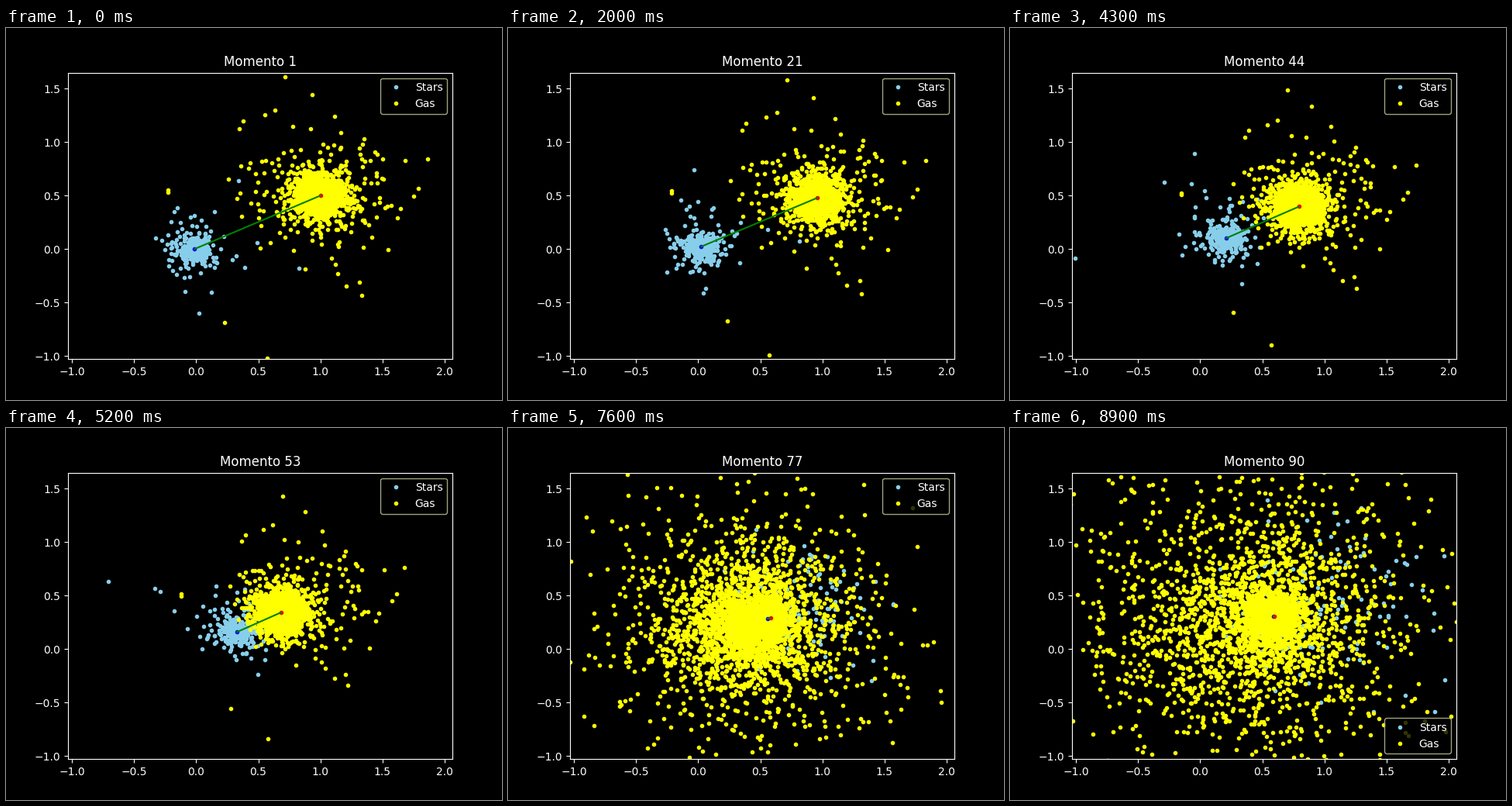
Recreate the animation shown at these times as a matplotlib script. Size 640x480 px, loop 9 s.

```python
import numpy as np
import matplotlib.pyplot as plt
from matplotlib.animation import FuncAnimation

plt.style.use("dark_background")
rng = np.random.default_rng(7)

FRAMES = 90
N_GAS, N_STARS = 3700, 390
MASS_CENTER = 0.62 + 0.30j
LEGEND_MOVE = 80

# Sparse outer particles as x + iy
GAS_HALO = np.array([
    .715+1.61j, .935+1.44j, .635+1.30j, .55+1.255j, 1.115+1.24j, .38+1.195j,
    .35+1.125j, .78+1.145j, .92+1.125j, 1.35+1.03j, 1.86+.84j, 1.68+.825j,
    1.50+.84j, 1.79+.565j, 1.75+.49j, 1.57+.405j, 1.45+.30j, 1.545-.01j,
    1.415+.11j, 1.315-.31j, 1.33-.435j, 1.21-.35j, 1.14-.23j, .88-.185j,
    .57-1.02j, .23-.69j, -.23+.55j, -.23+.53j, .26+.65j, .33+.47j,
    .365+.305j, .355+.52j, .515+.01j, .36+.775j, .42+.755j, .48+.54j])
STAR_HALO = np.array([
    -.325+.10j, -.275+.08j, -.15+.385j, -.175+.35j, .15+.35j, .34+.64j,
    .49+.06j, .83-.18j, .39-.17j, .32-.065j, .29-.10j, -.09-.40j,
    .12-.405j, .02-.60j, -.22-.16j, -.16-.24j, -.25-.01j])


def track(times, points):
    """Smooth path through the points, sampled once per frame."""
    k, p = np.array(times, float), np.array(points)
    m = np.gradient(p, k)
    n = np.arange(FRAMES)
    i = np.clip(np.searchsorted(k, n, "right") - 1, 0, len(k) - 2)
    h = k[i + 1] - k[i]
    s = (n - k[i]) / h
    return ((2*s**3 - 3*s**2 + 1) * p[i] + (s**3 - 2*s**2 + s) * h * m[i]
            + (3*s**2 - 2*s**3) * p[i + 1] + (s**3 - s**2) * h * m[i + 1])


def smooth(x):
    x = np.clip(x, 0, 1)
    return x * x * (3 - 2 * x)


def direction(n):
    return np.exp(2j * np.pi * rng.random(n))


def cluster(n, scale, cut):
    """Projected Plummer sphere, truncated at mass fraction cut."""
    u = rng.uniform(0, cut, n)
    return scale * np.sqrt(u / (1 - u)) * direction(n)


KEYS = [0, 20, 33, 52, 68, 76, 89]
APPROACH = [1.003+.50j, .96+.478j, .89+.443j, .685+.342j, .45+.232j]
cloud = track(KEYS, APPROACH + [.36+.20j, .38+.23j])
gas_mid = track(KEYS, APPROACH + [.583+.29j, .598+.305j])
star_mid = track(KEYS, [-.012+0j, .025+.022j, .104+.053j, .328+.158j,
                        .597+.298j, .56+.283j, .591+.305j])

# Gas: an orbiting core, part of it thrown out when the clusters meet
gas0 = np.r_[cluster(N_GAS, 0.068, 0.99), GAS_HALO - cloud[0]]
n_gas = len(gas0)
hold = 1 / (1 + (abs(gas0) / 0.45) ** 4)
gas_spin = hold ** 4 * rng.normal(0, 0.05, n_gas)
thrown = (rng.random(n_gas) < 0.58) & (np.arange(n_gas) < N_GAS)
kick = (thrown * 0.0185 * rng.rayleigh(1, n_gas)
        * rng.lognormal(0, 0.5, n_gas) * direction(n_gas))
kick_start = rng.uniform(54, 59, n_gas)
merge_start = rng.uniform(56, 77, n_gas)

# Stars: an orbiting core, part of it carried on past the gas
star0 = np.r_[cluster(N_STARS, 0.066, 0.96), STAR_HALO - star_mid[0]]
n_star = len(star0)
star_spin = rng.normal(0, 0.05, n_star)
swing = rng.uniform(-0.3, 0.5, n_star)
drift = (rng.random(n_star) < 0.28) * (
    rng.normal(0.016, 0.013, n_star) + 1j * rng.normal(0.006, 0.012, n_star))


def gas_at(n):
    merged = smooth((n - merge_start) / 12) * ~thrown
    core = cloud[n] + merged * (star_mid[n] - cloud[n])
    start = cloud[0] + gas0
    fall = 0.14 * (n / 52) ** 2 * (MASS_CENTER - start)
    swell = 1 + 0.8 * hold * smooth((n - 56) / 30)
    return (cloud[0] + gas0 * swell * np.exp(1j * gas_spin * n)
            + hold * (core - cloud[0]) + (1 - hold) * fall
            + kick * np.maximum(n - kick_start, 0))


def stars_at(n):
    reach = 1 + swing * np.sin(n / 22)
    return (star_mid[n] + star0 * reach * np.exp(1j * star_spin * n)
            + drift * max(n - 54, 0))


fig, ax = plt.subplots(figsize=(6.4, 4.8), dpi=100)
ax.set_xlim(-1.0317, 2.0625)
ax.set_ylim(-1.03, 1.6483)
stars, = ax.plot([], [], ".", color="skyblue", label="Stars")
gas, = ax.plot([], [], ".", color="yellow", label="Gas")
star_dot, = ax.plot([], [], ".", color="blue")
gas_dot, = ax.plot([], [], ".", color="red")
link, = ax.plot([], [], "-", color="green")
title = ax.set_title("Momento 1")
legend = ax.legend(loc="upper right", edgecolor="#cccc9c")


def place(line, z):
    z = np.atleast_1d(z)
    line.set_data(z.real, z.imag)


def update(n):
    place(stars, stars_at(n))
    place(gas, gas_at(n))
    place(star_dot, star_mid[n])
    place(gas_dot, gas_mid[n])
    place(link, [star_mid[n], gas_mid[n]])
    title.set_text(f"Momento {n + 1}")
    legend.set_loc("upper right" if n < LEGEND_MOVE else "lower right")
    return stars, gas, star_dot, gas_dot, link, title, legend


anim = FuncAnimation(fig, update, frames=FRAMES, interval=100,
                     repeat=True, repeat_delay=0, blit=False)
plt.show()
```
